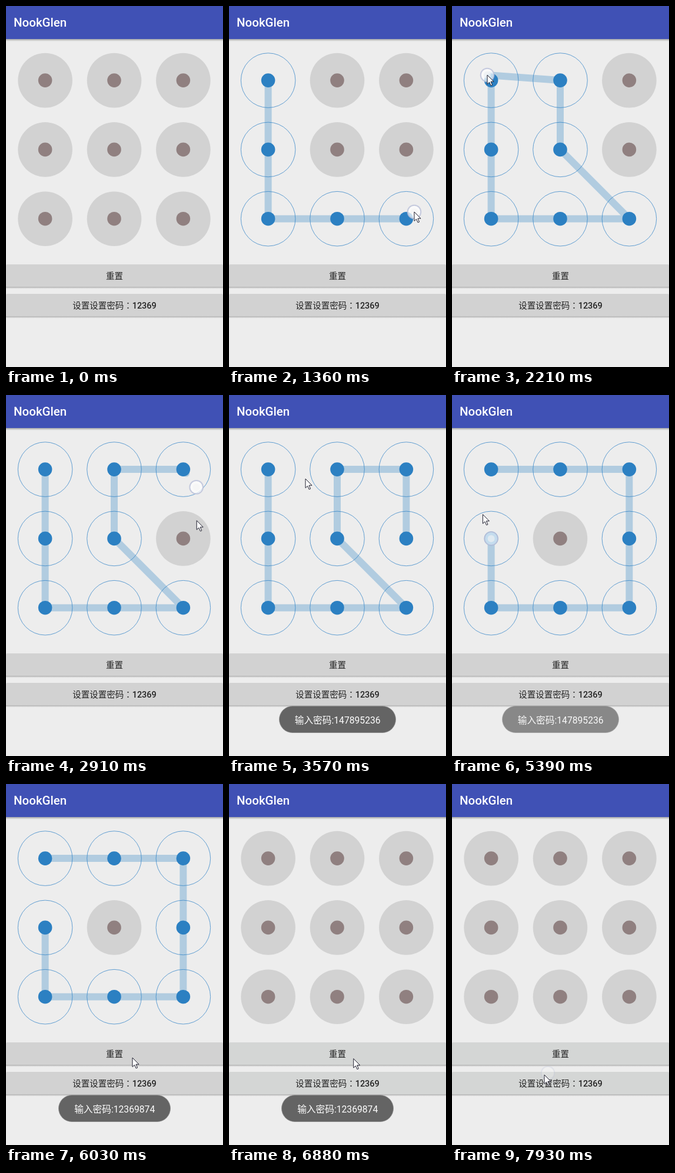
An HTML page for the animation above (8000 ms loop, 369x612 px).

```html
<!DOCTYPE html>
<html lang="zh-CN">
<head>
<meta charset="utf-8">
<style>
  html, body { margin: 0; width: 100%; height: 100%; overflow: hidden; background: #ededed; }
  svg { display: block; }
  text { font-family: Roboto, "Noto Sans CJK SC", "Noto Sans CJK", sans-serif; }
  .title { font-size: 20.5px; font-weight: 500; fill: #fff; }
  .label { font-size: 14.5px; fill: #222; text-anchor: middle; }
  .digits { font-weight: 500; }
  .colon { font-family: "Noto Sans CJK TC", "Noto Sans CJK", sans-serif; }
  .toast rect { fill: #646464; stroke: #8a8a8a; stroke-width: .7; }
  .toast text { font-size: 15.7px; fill: #fff; text-anchor: middle; }
  .off circle { fill: #d2d2d2; }
  .off .dot { fill: #908080; }
  .on circle { fill: none; stroke: #3d8ac9; stroke-width: .8; }
  .on .dot { fill: #2c80c2; stroke: none; }
</style>
</head>
<body>
<svg width="369" height="612" viewBox="0 0 369 612">
  <defs>
    <linearGradient id="shade" x2="0" y2="1">
      <stop stop-color="#000" stop-opacity=".3"/>
      <stop offset="1" stop-color="#000" stop-opacity="0"/>
    </linearGradient>
  </defs>
  <rect width="369" height="612" fill="#ededed"/>
  <rect width="369" height="56" fill="#4051b5"/>
  <rect y="56" width="369" height="4" fill="url(#shade)"/>
  <text class="title" x="13" y="35">NookGlen</text>

  <g id="rings"></g>
  <polyline id="trail" fill="none" stroke="#2c80c2" stroke-opacity=".31" stroke-width="12"
    stroke-linecap="round" stroke-linejoin="round"/>
  <g id="dots"></g>

  <g id="buttons"></g>
  <text class="label" x="184.5" y="463">重置</text>
  <text class="label" x="184.5" y="513">设置设置密码<tspan class="colon" lang="zh-TW">：</tspan><tspan class="digits">12369</tspan></text>

  <g id="toasts"></g>

  <g id="touch">
    <circle r="11.3" fill="#fff" fill-opacity=".72" stroke="#b9bfd8" stroke-opacity=".8" stroke-width="2"/>
    <circle r="6" fill="#f4f4f4" fill-opacity=".6"/>
  </g>
  <path id="cursor" d="M0 0V15.5L3.6 12.2L6.2 18L8.6 17L6 11.2H11Z" fill="#fff" stroke="#1c1c2c"/>
</svg>
<script>
const LOOP = 8000, BEAT = 140, LEAD = 120, LAG = 50, REACH = 46;
const $ = id => document.getElementById(id);
const clamp = v => Math.max(0, Math.min(1, v));
const within = ([a, b], t) => t >= a && t < b;

const nodes = Array.from({ length: 9 }, (_, i) => [66.6 + i % 3 * 117.4, 126.1 + (i / 3 | 0) * 117.3]);

// The picture updates in even beats between these times
const anchors = [400, 1360, 2210, 2490, 3570, 4700, 6030, 7930];

// Pointer legs: start, end, then stops (key number or point) passed at even speed
const legs = [
  [400, 1360, 7, 9, [315, 349]],
  [1500, 2150, 5, 2, [60, 117]],
  [2420, 3080, 3, [345, 185], 6],
  [3080, 3690, [130, 142]],
  [3690, 4700, 1, 3, 9, [274, 407], [244, 401]],
  [4700, 4820, [118, 382]],
  [4820, 5300, 7, 4],
  [5400, 5750, [8, 75]],
  [5750, 6150, [215, 464]],
  [6900, 8050, [157, 493]]
];
const strokes = [[400, 3080], [3840, 5400]];
const tap = [6160, 6300];

const toasts = [
  { text: "输入密码:147895236", w: 198, from: 3150, to: 5300 },
  { text: "输入密码:12369874", w: 190, from: 5560, to: 7650 }
];

function beat(now) {
  const i = anchors.filter(a => a <= now).length - 1;
  if (i < 0) return 0;
  const start = anchors[i], end = anchors[i + 1];
  if (!end) return start;
  const step = (end - start) / Math.round((end - start) / BEAT);
  return start + Math.floor((now - start) / step + .001) * step;
}

const gap = (p, q) => Math.hypot(p[0] - q[0], p[1] - q[1]);
const mix = (p, q, f) => p.map((v, i) => v + (q[i] - v) * f);

// Turns legs into timed key points
const route = [[400, nodes[0]]];
for (const [from, to, ...stops] of legs) {
  const start = route[route.length - 1][1];
  const pts = [start, ...stops.map(s => Array.isArray(s) ? s : nodes[s - 1])];
  const sums = [0];
  for (let i = 1; i < pts.length; i++) sums.push(sums[i - 1] + gap(pts[i - 1], pts[i]));
  const total = sums[sums.length - 1];
  pts.forEach((p, i) => route.push([from + (to - from) * sums[i] / total, p]));
}

function pointer(t) {
  const i = route.findIndex(k => k[0] >= t);
  if (i < 0) return route[route.length - 1][1];
  if (i === 0) return route[0][1];
  const [t0, p] = route[i - 1], [t1, q] = route[i];
  return mix(p, q, (t - t0) / (t1 - t0));
}

function picked(t) {
  const list = [];
  const run = strokes.filter(s => s[0] <= t).pop();
  if (!run || t >= tap[1]) return list;
  for (let u = run[0]; u <= Math.min(t, run[1]); u += 5) {
    const tip = pointer(u - LAG);
    nodes.forEach((n, i) => {
      if (!list.includes(i) && gap(tip, n) < REACH) list.push(i);
    });
  }
  return list;
}

function add(parent, tag, attrs) {
  const el = document.createElementNS("http://www.w3.org/2000/svg", tag);
  for (const k in attrs) el.setAttribute(k, attrs[k]);
  return parent.appendChild(el);
}

function layer(id, r, cls) {
  return nodes.map(([cx, cy]) => {
    const g = add($(id), "g", {});
    add(g, "circle", { cx, cy, r, class: cls });
    return g;
  });
}
const layers = [layer("rings", 46.3, "ring"), layer("dots", 11.8, "dot")];

for (const y of [438, 488]) {
  add($("buttons"), "rect", { y: y + 37.5, width: 369, height: 4, fill: "url(#shade)" });
  add($("buttons"), "rect", { y, width: 369, height: 38, rx: 2 });
}

for (const n of toasts) {
  n.el = add($("toasts"), "g", { class: "toast" });
  add(n.el, "rect", { x: 184.5 - n.w / 2, y: 527.5, width: n.w, height: 45, rx: 22.5 });
  add(n.el, "text", { x: 184.7, y: 556.5 }).textContent = n.text;
}

function place(el, [x, y], alpha) {
  el.setAttribute("transform", `translate(${x} ${y})`);
  el.setAttribute("opacity", alpha);
}

function draw(t) {
  const on = picked(t);
  const dragging = strokes.some(s => within(s, t));
  for (const cells of layers)
    cells.forEach((g, i) => g.setAttribute("class", on.includes(i) ? "on" : "off"));

  const points = on.map(i => nodes[i]);
  if (dragging && on.length) points.push(pointer(t - LAG));
  $("trail").setAttribute("points", points.join(" "));

  $("buttons").setAttribute("fill", t < tap[1] ? "#d2d2d2" : "#d4d6d5");
  for (const n of toasts)
    n.el.setAttribute("opacity", Math.min(clamp((t - n.from) / 230), clamp(1 - (t - n.to) / 240)));

  place($("touch"), pointer(t), dragging || within(tap, t) ? 1 : t >= 7930 ? .3 : 0);
  place($("cursor"), pointer(t + LEAD), t < 400 ? 0 : 1);
}

let shown = -1;
function tick() {
  const t = beat(performance.now() % LOOP);
  if (t !== shown) draw(shown = t);
  requestAnimationFrame(tick);
}
tick();
</script>
</body>
</html>
```
